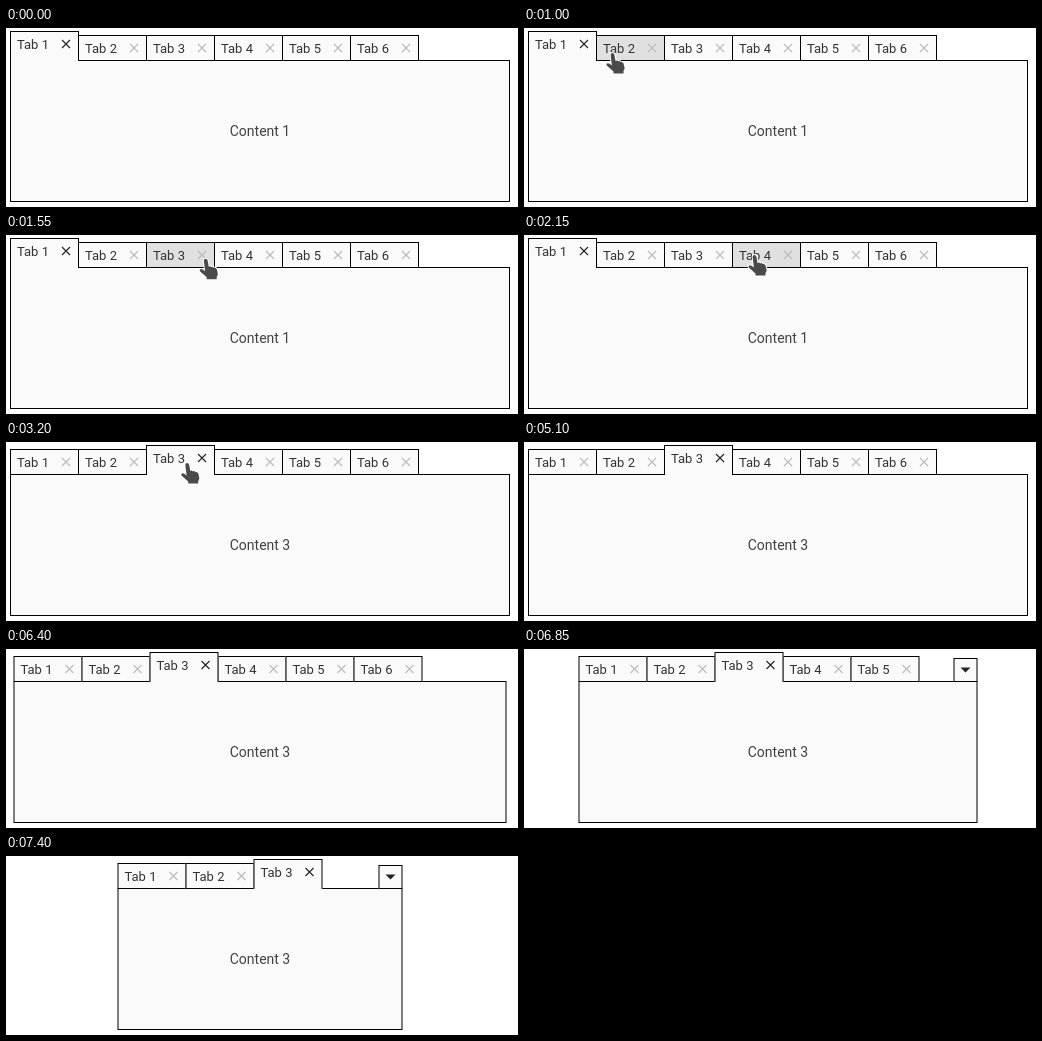
Animation, 512 px wide and 179 px high, one loop 8000 ms. Source, as an HTML page with a canvas:

```html
<!DOCTYPE html>
<html lang="en">
<head>
<meta charset="utf-8">
<title>Tabs</title>
<style>
  html, body { margin: 0; width: 100%; height: 100%; overflow: hidden; background: #fff; }
  canvas { display: block; }
</style>
</head>
<body>
<canvas id="stage" width="512" height="179"></canvas>
<script>
const ctx = document.getElementById('stage').getContext('2d');
const LOOP = 8000, STEP = 50, SELECT_TIME = 2950;
const TAB_WIDTH = 68, TAB_COUNT = 6, MENU_WIDTH = 24;
const PANEL_TOP = 32, PANEL_BOTTOM = 174, MIDDLE = 254;
const PAPER = '#fafafa', INK = '#222', TEXT = '#333', HOVER = '#e0e0e0';

const HAND = new Path2D(
  'M4.6 2Q4.6 0 6.4 0Q8.1 0 8.5 2L9.5 8Q11 7 12.3 8.4Q13.7 7.6 14.8 9' +
  'Q16.7 8.5 17.6 10.5L18.6 15Q18.5 17 17.5 18V20.5H7.5V18.5L1 12.8' +
  'Q-.3 11 1.6 10.3Q3 10 5.9 12.5Z');

const clamp = (v, low, high) => Math.min(Math.max(v, low), high);

// Top left corner of the hand: each move glides on from where the last one ended.
function pointerAt(t) {
  let x = -20, y = 29;
  const move = (from, to, nextX, nextY) => {
    const p = clamp((t - from) / (to - from), 0, 1);
    x += (nextX - x) * p;
    y += (nextY - y) * p;
  };
  move(250, 1000, 82, 25);
  move(1000, 1900, 264, 23);
  move(2000, 2150, 224, 20);
  move(2150, 2450, 171, 23);
  move(3100, 3450, 184, 16);
  move(3600, 3900, 232, 22);
  move(4000, 4350, 329, 25);
  move(4400, 5100, -22, 28);
  return { x, y };
}

// The panel narrows at a steady rate, in half pixels, on both sides.
function panelLeftAt(t) {
  const left = clamp(4 + 0.104 * (t - 6366), 4, 111.5);
  return Math.round(left * 2) / 2;
}

function box(left, top, right, bottom, fill) {
  ctx.fillStyle = fill;
  ctx.fillRect(left, top, right - left, bottom - top);
  ctx.strokeStyle = '#000';
  ctx.lineWidth = 1;
  ctx.strokeRect(left + 0.5, top + 0.5, right - left - 1, bottom - top - 1);
}

function label(text, x, y, size, align, color) {
  ctx.font = `${size}px Roboto, sans-serif`;
  ctx.textAlign = align;
  ctx.fillStyle = color;
  ctx.fillText(text, x, y);
}

function cross(x, y, color) {
  ctx.beginPath();
  for (const side of [-4, 4]) {
    ctx.moveTo(x - side, y - 4);
    ctx.lineTo(x + side, y + 4);
  }
  ctx.strokeStyle = color;
  ctx.lineWidth = 1.1;
  ctx.stroke();
}

function tab(index, left, active, hovered, tip) {
  const top = active ? 3 : 7;
  const closeX = left + 56, closeY = top + 13;
  box(left, top, left + TAB_WIDTH + 1, PANEL_TOP + 1, hovered ? HOVER : PAPER);
  if (active) {
    ctx.fillStyle = PAPER;
    ctx.fillRect(left + 1, PANEL_TOP, TAB_WIDTH - 1, 1);
    if (Math.hypot(tip.x - closeX, tip.y - closeY) < 9) {
      ctx.fillStyle = HOVER;
      ctx.beginPath();
      ctx.arc(closeX, closeY, 9, 0, 2 * Math.PI);
      ctx.fill();
    }
  }
  label(`Tab ${index + 1}`, left + 7, top + 18, 13, 'left', TEXT);
  cross(closeX, closeY, active ? INK : '#bbb');
}

function menuButton(right) {
  const middle = right - MENU_WIDTH / 2;
  box(right - MENU_WIDTH, 9, right, PANEL_TOP + 1, PAPER);
  ctx.fillStyle = INK;
  ctx.beginPath();
  ctx.moveTo(middle - 5, 18.5);
  ctx.lineTo(middle + 5, 18.5);
  ctx.lineTo(middle, 23.5);
  ctx.fill();
}

function hand({ x, y }) {
  ctx.save();
  ctx.translate(x, y);
  ctx.strokeStyle = '#fff';
  ctx.lineWidth = 2;
  ctx.stroke(HAND);
  ctx.fillStyle = '#4a4a4a';
  ctx.fill(HAND);
  ctx.restore();
}

function draw(t) {
  const left = panelLeftAt(t);
  const right = 2 * MIDDLE - left, width = right - left;
  const pointer = pointerAt(t);
  const tip = { x: pointer.x + 7, y: pointer.y };
  const active = t < SELECT_TIME ? 0 : 2;
  const hovered = Math.floor((pointer.x + 4 - left) / TAB_WIDTH);
  const allFit = TAB_COUNT * TAB_WIDTH + 1 <= width;
  const shown = allFit ? TAB_COUNT : Math.floor((width - MENU_WIDTH) / TAB_WIDTH);

  ctx.fillStyle = '#fff';
  ctx.fillRect(0, 0, 512, 179);
  box(left, PANEL_TOP, right, PANEL_BOTTOM, PAPER);
  label(`Content ${active + 1}`, MIDDLE, 108, 14, 'center', '#424242');

  const drawTab = i =>
    tab(i, left + i * TAB_WIDTH, i === active, i === hovered && i !== active, tip);
  for (let i = 0; i < shown; i++) if (i !== active) drawTab(i);
  drawTab(active);
  if (!allFit) menuButton(right);
  hand(pointer);
}

const start = performance.now();
function frame() {
  const t = (performance.now() - start) % LOOP;
  draw(Math.floor(t / STEP) * STEP);
  requestAnimationFrame(frame);
}
frame();
</script>
</body>
</html>
```
